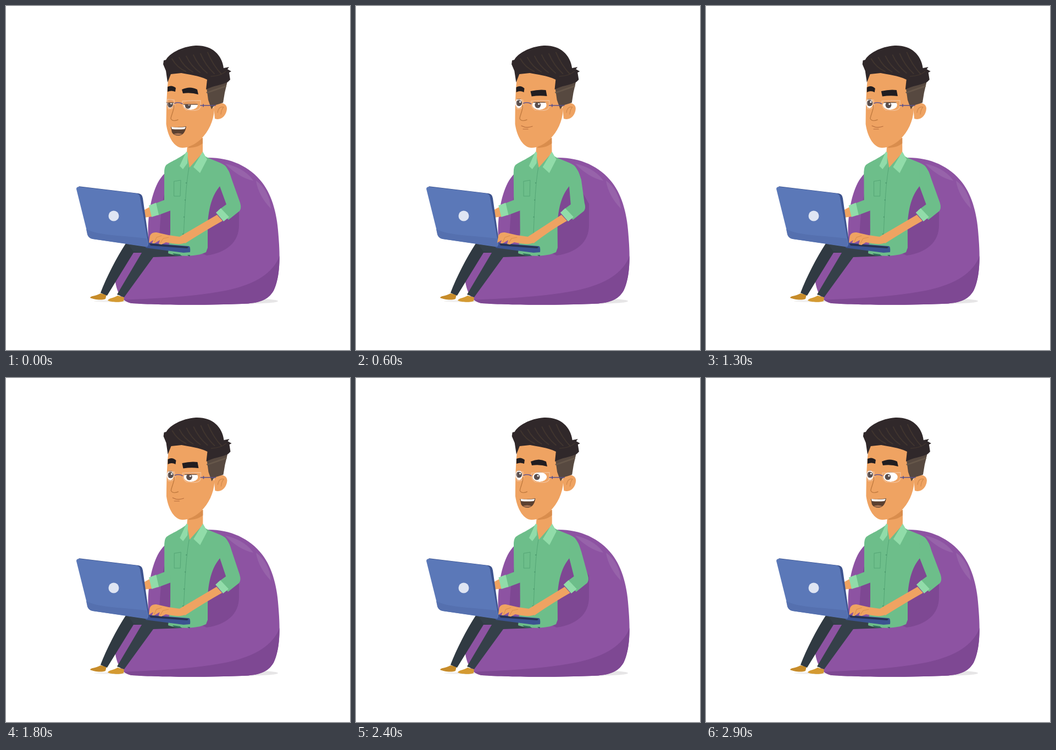
Animation, 626 px wide and 626 px high, one loop 3 s. Source, as an HTML page with a canvas:

```html
<!DOCTYPE html>
<html lang="en">
<head>
<meta charset="utf-8">
<title>Working on a beanbag</title>
<style>
html, body { margin: 0; width: 100%; height: 100%; overflow: hidden; background: #fff; }
canvas { display: block; width: 626px; height: 626px; }
</style>
</head>
<body>
<canvas id="stage" width="626" height="626"></canvas>
<script>
const ctx = document.getElementById('stage').getContext('2d');
const LOOP = 3000, STEP = 100;
const SKIN = '#efa362', SKIN_DARK = '#d98d4d', GREEN = '#6dbe8a', GREEN_DARK = '#55a676',
      MINT = '#91dca9', HAIR = '#30282a', PANTS = '#354049', PURPLE = '#8d53a2', PURPLE_DARK = '#7e4893';

// [time, value] pairs, eased between neighbours
const SWAY = [[0, 0], [600, -2.1], [1000, 0], [1300, -1], [1800, .4], [2400, -1.7], [2900, -.1], [3000, 0]];
const ELBOW = [[0, 0], [350, -5], [600, -10], [1000, 0], [1300, 0], [1800, -1], [2100, -6], [2400, -4], [2900, 1], [3000, 0]];
const SMILE = [[0, 1], [200, 1], [400, 0], [1900, 0], [2100, 1], [3000, 1]];
const LID = [[0, .45], [100, .9], [300, .05], [800, .1], [1000, .68], [1200, .1], [1900, .1], [2100, 0], [2900, 0], [3000, .45]];

function keyed(keys, t) {
  const i = keys.findIndex(k => k[0] > t);
  const [t0, a] = keys[i - 1], [t1, b] = keys[i];
  return a + (b - a) * (1 - Math.cos(Math.PI * (t - t0) / (t1 - t0))) / 2;
}

function fill(d, color) {
  ctx.fillStyle = color;
  ctx.fill(new Path2D(d));
}

function line(d, color, width = 1) {
  ctx.strokeStyle = color;
  ctx.lineWidth = width;
  ctx.stroke(new Path2D(d));
}

function oval(x, y, rx, ry, color) {
  ctx.fillStyle = color;
  ctx.beginPath();
  ctx.ellipse(x, y, rx, ry, 0, 0, Math.PI * 2);
  ctx.fill();
}

function group(draw) {
  ctx.save();
  draw();
  ctx.restore();
}

function beanbag() {
  oval(430, 537, 65, 5, '#e6e5e6');
  oval(205, 537, 45, 2, '#efeeee');
  const bag = 'M365 276C406 275 443 291 466 321C486 347 494 383 496 420C499 457 499 493 487 518C477 535 461 541 430 542C360 545 275 544 229 541C209 538 200 518 198 494C198 475 220 445 259 425C257 385 263 348 276 322C290 296 318 279 365 276Z';
  fill(bag, PURPLE);
  group(() => {
    ctx.clip(new Path2D(bag));
    fill('M500 448C490 484 457 505 404 517C350 528 285 532 205 535L215 550H505Z', PURPLE_DARK);
    fill('M300 304C286 335 281 375 279 425L310 430L365 454C401 449 424 430 424 399V360L390 300Z', PURPLE_DARK);
    fill('M399 287C419 291 440 302 450 318C432 314 414 303 399 287Z', '#9763aa');
    fill('M455 318C470 328 480 346 482 369C469 355 458 338 455 318Z', '#9763aa');
  });
}

function legs() {
  fill('M153 531C154 527 164 528 172 523L183 525L181 533C173 536 160 534 153 531Z', '#c78c2a');
  fill('M185 536C187 531 196 532 203 527L215 530L214 537C207 540 192 539 185 536Z', '#d49a32');
  fill('M218 432L262 433L247 449L232 449L184 527L172 522C183 493 201 458 218 432Z', '#303a42');
  fill('M222 433L320 447V455L268 457L215 530L202 525L247 449L232 447Z', PANTS);
}

function farArm() {
  fill('M250 372L261 366L267 383L252 385Z', SKIN);
  fill('M298 286C289 291 288 298 288 309V353L270 360L276 381L300 372Z', GREEN);
  fill('M260 363L273 358L278 380L265 384Z', MINT);
}

function torso() {
  fill('M329 266C317 277 297 284 291 290C287 295 288 306 289 321L299 360V413L295 450C311 456 347 457 364 448L367 440V395C369 372 373 347 389 328L407 311C405 302 404 295 398 290C388 283 371 279 362 273Z', GREEN);
  fill('M303 450L317 452L319 455L307 454ZM330 453L335 453L334 456Z', '#326b5d');
  line('M333 294C328 322 326 355 323 422', GREEN_DARK);
  line('M306 319L318 317L317 346L306 346Z', GREEN_DARK);
  for (let i = 0; i < 4; i++) oval(328 - i * 2, 322 + i * 31, 1.1, 1.1, '#4a976c');
  fill('M331 240H358V267L334 294L329 267Z', SKIN);
  fill('M332 256L358 240V250C350 256 342 258 332 258Z', SKIN_DARK);
  fill('M328 265L316 291L322 297L330 286L331 267Z', MINT);
  fill('M358 265L366 279L353 304L341 293Z', MINT);
}

function nearArm(bend, t) {
  const shift = bend * .95, hand = bend * .28;
  const tap = Math.sin(t / STEP * 2.1) * 1.2;
  const x = n => n + shift, h = n => n + hand;
  // upper sleeve follows the elbow, the shoulder stays put
  fill(`M389 290C404 290 407 303 411 316L${x(426)} 358Q${x(429)} 368 ${x(425)} 373L${x(405)} 389L${x(386)} 372L${x(401)} 361L389 328Z`, GREEN);
  fill(`M${x(384)} 380L${x(394)} 391Q${x(362)} 409 ${h(326)} 432L${h(314)} 421Z`, SKIN);
  fill(`M${x(382)} 376L${x(391)} 368L${x(406)} 384L${x(396)} 392Z`, MINT);
  group(() => {
    ctx.translate(hand, 0);
    fill(`M260 431L262 418Q265 411 274 412L296 417L317 420L328 430Q319 435 302 432L291 430L283 ${434 + tap}L278 ${433 + tap}L280 426L270 ${432 - tap}L266 ${432 - tap}L268 426Z`, SKIN);
    line(`M270 ${430 - tap}L274 421L283 418M281 ${431 + tap}L286 423L296 421`, SKIN_DARK);
  });
}

function laptop() {
  fill('M257 431L333 437Q336 438 335 448L323 449L254 440Z', '#3b5391');
  fill('M261 432L332 438L330 441L263 436Z', '#283252');
  fill('M132 328L241 341Q248 342 249 350L261 435L258 439L247 430Z', '#3c538f');
  fill('M128 333Q128 329 133 329L237 341Q243 342 244 348L259 433Q259 439 253 438L158 424Q151 423 149 417Z', '#5b78b8');
  fill('M146 406C169 418 207 417 256 423L258 438L158 424Q150 422 148 416Z', '#5570af');
  oval(196, 382, 9.5, 9.5, '#dfe5f3');
}

function eye(x, y, rx, ry, lid, px, py) {
  group(() => {
    ctx.beginPath();
    ctx.ellipse(x, y, rx, ry, 0, 0, Math.PI * 2);
    ctx.clip();
    oval(x, y, rx, ry, '#fff');
    oval(px, py, 5.4, 5.6, '#5a4f4e');
    oval(px + 2, py - 2, 1.6, 1.6, '#fff');
    const edge = y - ry + lid * ry * 2;
    ctx.fillStyle = '#e69c60';
    ctx.fillRect(x - rx, y - ry - 1, rx * 2, edge - y + ry + 1);
    line(`M${x - rx} ${edge}H${x + rx}`, '#60483b', 1.2);
  });
}

function eyes(smile, lid) {
  const frown = 1 - smile;
  eye(298.5, 177, 6.5, 9, lid, 299 - smile * .5, 176 + lid * 7);
  eye(336, 180, 13, 9, Math.min(.85, lid + frown * .16), 333 - smile * 2, 180 + lid * 3);
  const drop = frown * 3;
  fill(`M294 ${147 + frown}Q302 143 309 ${149 + frown}L308 ${156 + frown}Q301 153 294 ${156 + frown}Z`, '#211d20');
  fill(`M320 ${152 + drop}Q335 ${145 + drop * 2.1} 348 ${152 + drop * .3}L350 ${161 + drop}Q337 ${157 + drop * 1.7} 322 ${159 + drop * 1.8}Z`, '#211d20');
  group(() => {
    ctx.globalAlpha = .5;
    line('M294 170L306 171L307 181Q306 188 295 187ZM321 173L354 172V183Q352 190 342 190L328 189Q321 186 321 173Z', '#f7d9c6', 1.5);
  });
  line('M307 177Q314 174 321 178', '#65568c', 1.5);
  line('M354 181L381 181M359 179V183', '#59508c', 1.7);
}

function mouth(smile) {
  if (smile < .35) {
    line('M303 218Q312 223 323 219M306 224L315 224', '#b86f3e', 1.2);
    return;
  }
  const low = 221 + 15 * smile;
  fill(`M300 220Q314 222 328 219Q326 ${low - 2} 315 ${low}Q305 ${low} 302 ${low - 6}Z`, '#5b4030');
  fill('M301 220Q314 222 327 220L325 224Q313 225 302 224Z', '#fff');
  fill(`M305 ${low - 3}Q313 ${low - 6} 321 ${low - 3}Q314 ${low + 1} 305 ${low - 3}Z`, '#b27a56');
}

function hair() {
  fill('M365 149L403 137L398 158L395 176L382 180Q377 182 374 188L368 171Z', '#574940');
  fill('M364 157L401 144V147L366 159Z', '#66574a');
  fill('M287 99L291 98C297 87 318 74 345 72C374 71 393 88 396 113L406 111L403 115L410 119L406 121L408 134L404 138C393 144 376 145 364 152L366 134C350 126 333 125 319 122L300 124L294 139L291 118L286 106Z', HAIR);
  for (let i = 0; i < 6; i++) {
    const x = 302 + i * 13;
    line(`M${x} ${96 - i * 2.3}Q${x + 9} ${112 - i} ${x + 25} ${119 + i}`, '#40352f', 2);
  }
  line('M373 128Q391 127 400 119', '#40352f', 1.5);
}

function head(smile, lid) {
  fill('M378 183C385 174 402 174 402 187C401 200 391 209 380 205Z', SKIN);
  line('M385 194Q387 182 396 184Q392 188 391 197', '#d18a4d', 1.2);
  fill('M297 118H370L375 180L379 188C378 210 368 229 355 242C344 252 332 258 321 258C307 258 295 240 291.5 215C292 184 292 155 297 118Z', SKIN);
  hair();
  eyes(smile, lid);
  line('M306 181C305 192 300 200 300 205Q303 211 313 207', '#c17b40', 1.4);
  mouth(smile);
}

function draw(t) {
  const sway = keyed(SWAY, t);
  ctx.fillStyle = '#fff';
  ctx.fillRect(0, 0, 626, 626);
  ctx.lineCap = ctx.lineJoin = 'round';
  beanbag();
  legs();
  // lean from the hips: the lean grows with height above the seat
  const lean = drawPart => group(() => {
    ctx.transform(1, 0, -sway / 250, 1, sway * 450 / 250, 0);
    drawPart();
  });
  lean(() => {
    farArm();
    torso();
    head(keyed(SMILE, t), keyed(LID, t));
  });
  laptop();
  lean(() => nearArm(keyed(ELBOW, t), t));
}

function tick() {
  draw(Math.floor(performance.now() % LOOP / STEP) * STEP);
  requestAnimationFrame(tick);
}
tick();
</script>
</body>
</html>
```
